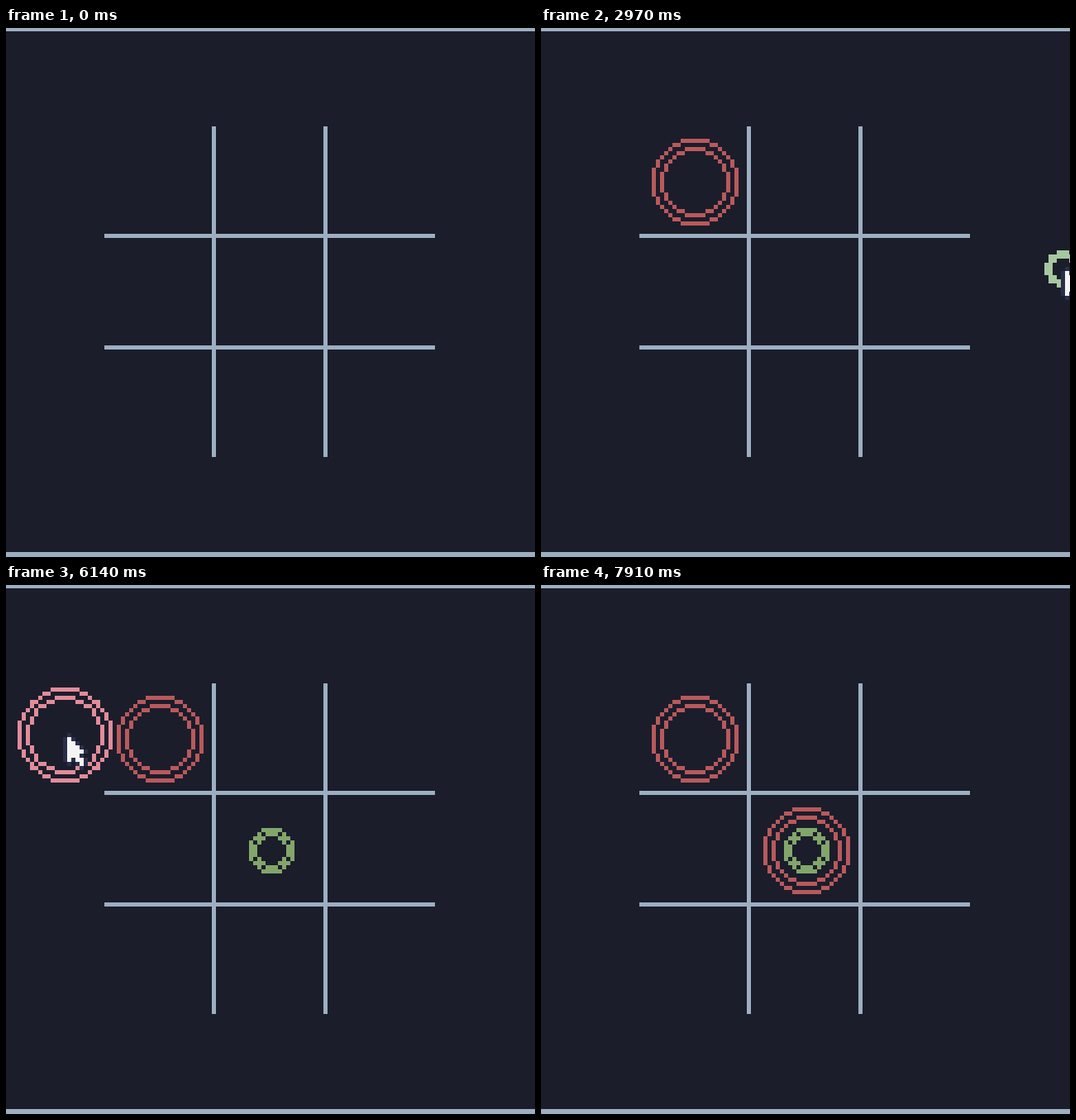
Animation of 640x640 px, one loop 8 s. Source, as an HTML page with a canvas:

```html
<!DOCTYPE html>
<html lang="en">
<head>
<meta charset="utf-8">
<title>Nested rings board</title>
<style>
  html, body { margin: 0; width: 100%; height: 100%; overflow: hidden; background: #1b1d2b; }
  canvas { display: block; width: 640px; height: 640px; }
</style>
</head>
<body>
<canvas id="stage" width="640" height="640"></canvas>
<script>
const ctx = document.getElementById('stage').getContext('2d');
const LOOP = 8000, STEP = 70;
const C = {
  bg: '#1b1d2b', line: '#9cafc1', hover: '#263c55',
  red: '#b9595c', pink: '#e28c9a', green: '#82a66a', mint: '#a7c7a0',
  white: '#f4f4f4', edge: '#292f49'
};

// Each turn: a ring is carried in along a path of [step, x, y], dropped, and the pointer leaves.
// "low" is the time at which the pulsing radius is smallest.
const turns = [
  { start: 200, drop: 960, leave: 1420, gone: 1700, low: 770,
    size: [10, 8], held: C.pink, done: C.red, at: [37, 37],
    path: [[0, -4, 46], [3, 17, 42], [6, 30, 38], [8, 32, 38], [9, 33, 37]],
    exit: [[40, 37], [62, 30], [90, 22], [118, 14]] },
  { start: 2970, drop: 3880, leave: 4410, gone: 4620, low: 3920,
    size: [5, 4], held: C.mint, done: C.green, at: [64, 64],
    path: [[0, 126, 58], [3, 98, 58], [6, 73, 59], [8, 68, 60], [11, 64, 62]],
    exit: [[53, 57], [28, 44], [2, 28]] },
  { start: 6140, drop: 7120, leave: 7770, gone: 7910, low: 6610,
    size: [10, 8], held: C.pink, done: C.red, at: [64, 64],
    path: [[0, 14, 36], [2, 29, 43], [4, 42, 52], [6, 53, 59], [9, 59, 62], [11, 60, 63]],
    exit: [[84, 65], [109, 66]] }
];

const arrow = ['#', '##', '###', '####', '###', '#.##', '...#'];
const arrowDots = arrow.flatMap((row, y) =>
  [...row].flatMap((c, x) => c === '#' ? [[x, y]] : []));

// One art pixel is 5 screen pixels, shifted by one.
function box(x, y, w, h, color) {
  ctx.fillStyle = color;
  ctx.fillRect(x * 5 - 1, y * 5 - 1, w * 5, h * 5);
}

const dot = (x, y, color) => box(x, y, 1, 1, color);

function circle(cx, cy, r, color) {
  for (let a = 0; a <= r; a++) {
    const b = Math.round(Math.sqrt(r * r - a * a));
    if (a > b) break;
    for (const sx of [-1, 1]) for (const sy of [-1, 1]) {
      dot(cx + a * sx, cy + b * sy, color);
      dot(cx + b * sx, cy + a * sy, color);
    }
  }
}

function rings(x, y, size, grow, color) {
  for (const r of size) circle(x, y, r + grow, color);
}

function pointer(x, y) {
  for (const [dx, dy] of arrowDots)
    for (const [ox, oy] of [[-1, 0], [1, 0], [0, -1], [0, 1]])
      dot(x + dx + ox, y + dy + oy, C.edge);
  for (const [dx, dy] of arrowDots) dot(x + dx, y + dy, C.white);
}

function along(path, n) {
  const last = path[path.length - 1];
  if (n >= last[0]) return [last[1], last[2]];
  const i = path.findIndex(p => p[0] > n);
  const [n0, x0, y0] = path[i - 1], [n1, x1, y1] = path[i];
  const k = (n - n0) / (n1 - n0);
  return [Math.round(x0 + (x1 - x0) * k), Math.round(y0 + (y1 - y0) * k)];
}

function cursorAt(turn, t) {
  if (t >= turn.leave) return turn.exit[Math.floor((t - turn.leave) / STEP)];
  const [x, y] = along(turn.path, Math.floor((t - turn.start) / STEP));
  return [x + 1, y + 1];
}

function hover([x, y]) {
  const col = Math.floor((x - 24) / 27), row = Math.floor((y - 24) / 27);
  if (col < 0 || col > 2 || row < 0 || row > 2) return;
  box(24 + col * 27, 24 + row * 27, 26, 26, C.hover);
}

function board() {
  for (const p of [50, 77]) {
    box(p, 24, 1, 80, C.line);
    box(24, p, 80, 1, C.line);
  }
  ctx.fillRect(0, 0, 640, 4);
  ctx.fillRect(0, 634, 640, 6);
}

function carried(turn, t) {
  const n = Math.floor((t - turn.start) / STEP);
  const [x, y] = along(turn.path, n);
  const dx = n ? x - along(turn.path, n - 1)[0] : 0;
  const time = turn.start + n * STEP;
  const grow = Math.round(-Math.cos((time - turn.low) / 1000 * 2 * Math.PI));
  // Fast sideways motion smears the ring by one pixel.
  if (Math.abs(dx) > 1) rings(x - Math.sign(dx), y, turn.size, grow, turn.held);
  rings(x, y, turn.size, grow, turn.held);
}

function draw(t) {
  ctx.fillStyle = C.bg;
  ctx.fillRect(0, 0, 640, 640);
  const turn = turns.find(u => t >= u.start && t < u.gone);
  const cursor = turn && cursorAt(turn, t);
  if (cursor) hover(cursor);
  board();
  for (const u of turns) if (t >= u.drop) rings(...u.at, u.size, 0, u.done);
  if (turn && t < turn.drop) carried(turn, t);
  if (cursor) pointer(...cursor);
}

const begin = performance.now();
function frame() {
  draw((performance.now() - begin) % LOOP);
  requestAnimationFrame(frame);
}
frame();
</script>
</body>
</html>
```
